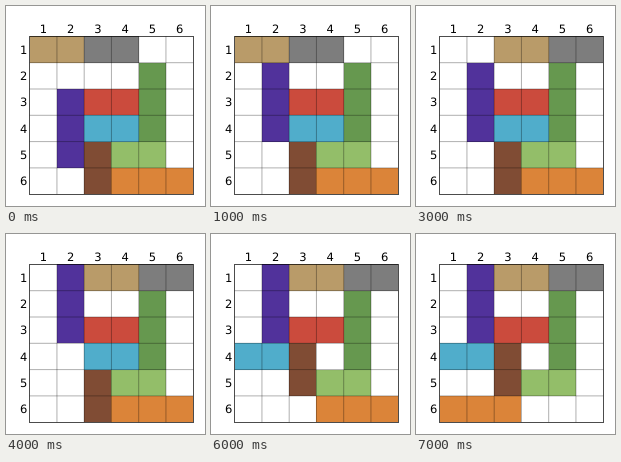
Write an HTML page that moves like this. It is 199 px wide and 200 px high and loops after 8000 ms.

```html
<!DOCTYPE html>
<html lang="en">
<head>
<meta charset="utf-8">
<title>Sliding blocks</title>
<style>
  html, body { margin: 0; width: 100%; height: 100%; overflow: hidden; background: #fff; }
  svg { display: block; width: 100vw; height: 100vh; }
  text { font: 11.5px "DejaVu Sans", sans-serif; fill: #000; text-rendering: geometricPrecision; }
  .top { text-anchor: middle; }
  .side { text-anchor: end; }

  /* Blocks live in cell units: one unit is one grid square. */
  .blocks rect {
    shape-rendering: crispEdges;
    animation-duration: 8s;
    animation-timing-function: step-end;
    animation-iteration-count: infinite;
  }
  .purple { animation-name: purple; }
  .gray   { animation-name: gray; }
  .tan    { animation-name: tan; }
  .cyan   { animation-name: cyan; }
  .brown  { animation-name: brown; }
  .orange { animation-name: orange; }

  @keyframes purple { 0% { y: 2px } 12.5% { y: 1px } 50%, 100% { y: 0px } }
  @keyframes gray   { 0% { x: 2px } 25%, 100% { x: 4px } }
  @keyframes tan    { 0% { x: 0px } 37.5%, 100% { x: 2px } }
  @keyframes cyan   { 0% { x: 2px } 62.5%, 100% { x: 0px } }
  @keyframes brown  { 0% { y: 4px } 75%, 100% { y: 3px } }
  @keyframes orange { 0% { x: 3px } 87.5%, 100% { x: 0px } }
</style>
</head>
<body>
<svg viewBox="0 0 199 200" preserveAspectRatio="none">
  <g class="blocks" transform="translate(23.7 30.4) scale(27.25 26.3)">
    <rect class="tan" x="0" y="0" width="2" height="1" fill="#b99b69"/>
    <rect class="gray" x="2" y="0" width="2" height="1" fill="#7d7d7d"/>
    <rect x="4" y="1" width="1" height="3" fill="#66984f"/>
    <rect class="purple" x="1" y="2" width="1" height="3" fill="#51329b"/>
    <rect x="2" y="2" width="2" height="1" fill="#cb4b3d"/>
    <rect class="cyan" x="2" y="3" width="2" height="1" fill="#50adcb"/>
    <rect class="brown" x="2" y="4" width="1" height="2" fill="#804c34"/>
    <rect x="3" y="4" width="2" height="1" fill="#93be69"/>
    <rect class="orange" x="3" y="5" width="3" height="1" fill="#db8439"/>
  </g>
  <path id="grid" fill="none" stroke="#000" stroke-opacity=".45" stroke-width=".7"/>
  <rect x="23.5" y="30.5" width="164" height="158" fill="none" stroke="#000" stroke-opacity=".7"/>
  <g id="labels"></g>
</svg>
<script>
  const left = 23.7, top0 = 30.4, w = 27.25, h = 26.3, n = 6;
  const labels = document.getElementById('labels');

  function label(cls, value, x, y) {
    const t = document.createElementNS('http://www.w3.org/2000/svg', 'text');
    t.setAttribute('class', cls);
    t.setAttribute('x', x);
    t.setAttribute('y', y);
    t.textContent = value;
    labels.append(t);
  }

  let d = '';
  for (let i = 0; i < n; i++) {
    label('top', i + 1, left + (i + 0.5) * w, 27);
    label('side', i + 1, 21.3, top0 + (i + 0.5) * h + 4.2);
    if (i) d += `M${left + i * w} ${top0}v${n * h}M${left} ${top0 + i * h}h${n * w}`;
  }
  document.getElementById('grid').setAttribute('d', d);
</script>
</body>
</html>
```
